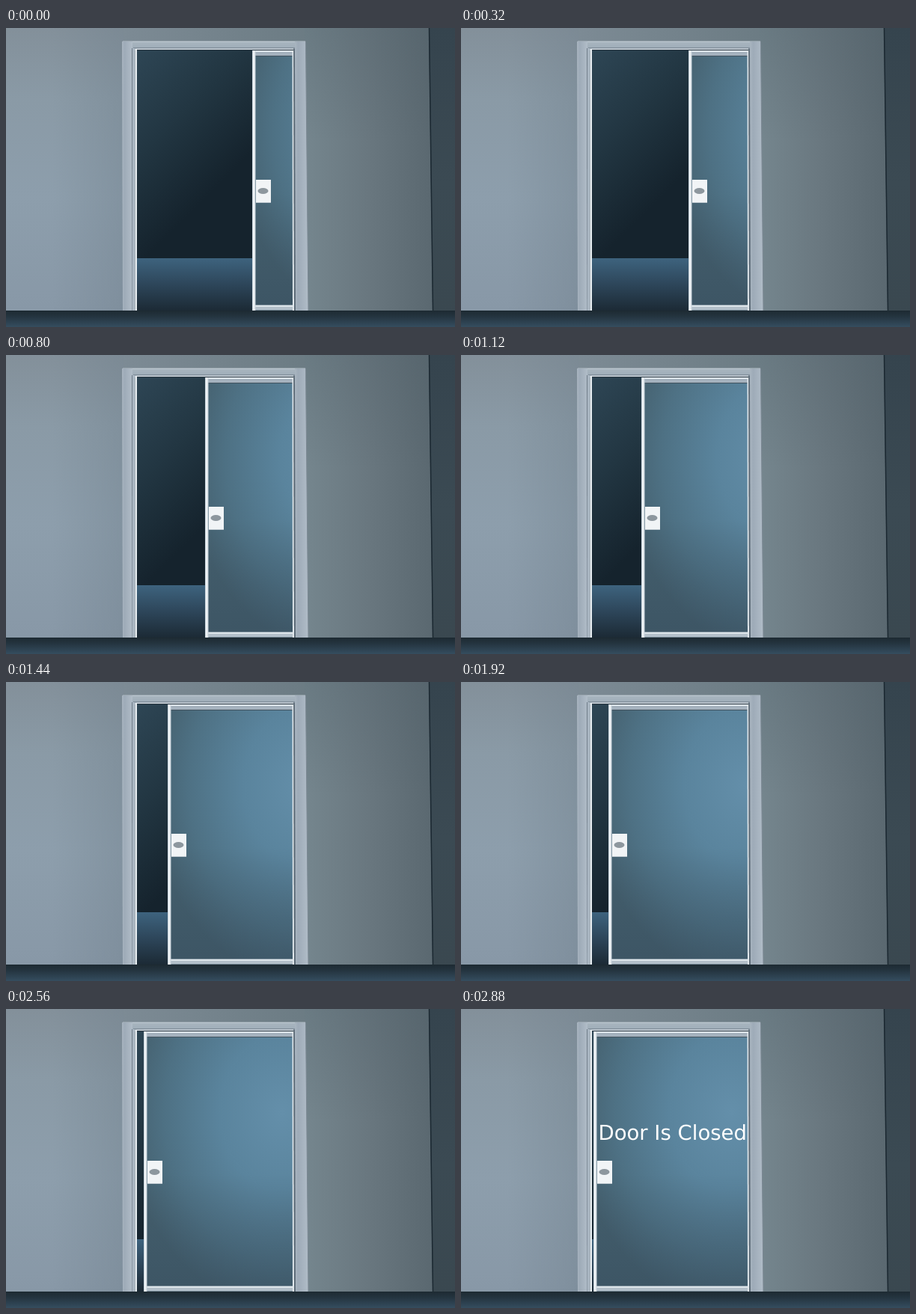
These frames come from a looping animation (600x400 px, 3.04 s). An HTML page:

```html
<!DOCTYPE html>
<html lang="en">
<head>
<meta charset="utf-8">
<title>Sliding door</title>
<style>
html, body { margin: 0; width: 100%; height: 100%; overflow: hidden; background: #1f2e37; }
svg { display: block; width: 100vw; height: 100vh; }
text {
  font: 27.5px "DejaVu Sans", Verdana, sans-serif;
  fill: #fff;
  text-anchor: middle;
  text-rendering: geometricPrecision;
}
</style>
</head>
<body>
<svg viewBox="0 0 600 400">
  <defs>
    <linearGradient id="wallLeft" x2="0" y2="1">
      <stop offset="0" stop-color="#83909a"/>
      <stop offset=".25" stop-color="#8a9aa6"/>
      <stop offset=".6" stop-color="#8d9eac"/>
      <stop offset="1" stop-color="#8898a7"/>
    </linearGradient>
    <linearGradient id="wallShade">
      <stop offset=".4" stop-color="#6e7e8a" stop-opacity="0"/>
      <stop offset="1" stop-color="#6e7e8a" stop-opacity=".35"/>
    </linearGradient>
    <linearGradient id="wallTop">
      <stop offset="0" stop-color="#7d8b95"/>
      <stop offset="1" stop-color="#6b7b83"/>
    </linearGradient>
    <linearGradient id="wallRight">
      <stop offset="0" stop-color="#75868e"/>
      <stop offset=".5" stop-color="#69777f"/>
      <stop offset="1" stop-color="#5a6870"/>
    </linearGradient>
    <linearGradient id="topShade" x2="0" y2="1">
      <stop offset="0" stop-color="#4a5a63" stop-opacity=".25"/>
      <stop offset=".4" stop-color="#4a5a63" stop-opacity="0"/>
    </linearGradient>
    <linearGradient id="corner" x2="0" y2="1">
      <stop offset="0" stop-color="#35444e"/>
      <stop offset=".55" stop-color="#3b4a53"/>
      <stop offset="1" stop-color="#3a4850"/>
    </linearGradient>
    <linearGradient id="ground" x2="0" y2="1">
      <stop offset="0" stop-color="#1d2a32"/>
      <stop offset=".35" stop-color="#24343f"/>
      <stop offset="1" stop-color="#354d5f"/>
    </linearGradient>
    <linearGradient id="room" gradientUnits="userSpaceOnUse" x1="175" y1="29" x2="320" y2="174">
      <stop offset="0" stop-color="#2e4655"/>
      <stop offset=".5" stop-color="#223642"/>
      <stop offset="1" stop-color="#15232d"/>
    </linearGradient>
    <linearGradient id="roomFloor" x2="0" y2="1">
      <stop offset="0" stop-color="#3e637e"/>
      <stop offset=".5" stop-color="#2d465a"/>
      <stop offset="1" stop-color="#1c2a35"/>
    </linearGradient>
    <linearGradient id="jamb">
      <stop offset="0" stop-color="#a9b5c0"/>
      <stop offset=".25" stop-color="#9eabb8"/>
      <stop offset="1" stop-color="#b1bdc8"/>
    </linearGradient>
    <linearGradient id="header" x2="0" y2="1">
      <stop offset="0" stop-color="#a9b6c0"/>
      <stop offset="1" stop-color="#9eacb8"/>
    </linearGradient>
    <radialGradient id="glass" gradientUnits="userSpaceOnUse" cx="0" cy="0" r="1"
      gradientTransform="translate(185 138) scale(210 262)">
      <stop offset="0" stop-color="#648faa"/>
      <stop offset=".4" stop-color="#5a849d"/>
      <stop offset=".75" stop-color="#4e7184"/>
      <stop offset="1" stop-color="#445f6d"/>
    </radialGradient>
    <linearGradient id="glassShade" x2="0" y2="1">
      <stop offset=".55" stop-color="#34495a" stop-opacity="0"/>
      <stop offset="1" stop-color="#34495a" stop-opacity=".45"/>
    </linearGradient>
    <clipPath id="opening"><path d="M175 29H384V378H175z"/></clipPath>
  </defs>

  <path fill="url(#wallTop)" d="M150 0H410V30H150z"/>
  <path fill="url(#wallLeft)" d="M0 0H157V378H0z"/>
  <path fill="url(#wallShade)" d="M0 0H157V378H0z"/>
  <path fill="url(#wallRight)" d="M399 0H570V378H399z"/>
  <path fill="url(#topShade)" d="M399 0H570V378H399z"/>
  <path fill="url(#corner)" d="M565 0H600V378H570z"/>
  <path stroke="#1b2831" stroke-width="1.5" d="M565.5 0L570.5 378"/>
  <path fill="url(#ground)" d="M0 378H600V400H0z"/>

  <path fill="url(#room)" d="M175 29H384V308H175z"/>
  <path fill="url(#roomFloor)" d="M175 308H384V378H175z"/>

  <g clip-path="url(#opening)">
    <g id="door">
      <path fill="url(#glass)" d="M0 30H215V378H0z"/>
      <path fill="url(#glassShade)" d="M0 30H215V378H0z"/>
      <path fill="#a5b2be" d="M0 30H215V37H0z"/>
      <path fill="#dfe7ec" d="M0 30H215V32H0z"/>
      <path fill="#42535f" d="M4 37H215V38H4z"/>
      <path fill="#b4c0ca" d="M0 370.5H215V377.5H0z"/>
      <path fill="#dde5ea" d="M4 371H215V373H4z"/>
      <path fill="#c6d1d9" d="M0 30H4.5V378H0z"/>
      <path fill="#edf2f5" d="M1 30H3.5V378H1z"/>
      <path fill="#f1f4f6" d="M5 203H25V234H5z"/>
      <path fill="#c3ccd3" d="M5 233H25V234H5z"/>
      <ellipse cx="14.5" cy="218" rx="7" ry="4" fill="#8d979e"/>
    </g>
  </g>

  <path fill="url(#header)" d="M156 18H401V28H156z"/>
  <path fill="#bac5ce" d="M156 17.5H400V19H156z"/>
  <path fill="#62707d" d="M170 26.5H386V27.5H170z"/>
  <path fill="#d3dce3" d="M173 27.5H384V29H173z"/>
  <path fill="#26343f" d="M175 29H384V30H175z"/>
  <path fill="url(#jamb)" d="M155 18H169V378H156z"/>
  <path fill="#6f7c89" d="M168 27H169V378H168.5z"/>
  <path fill="#a9b6c2" d="M169 27H172.5V378H169z"/>
  <path fill="#e8eef2" d="M172.5 28H175V378H172.5z"/>
  <path fill="url(#jamb)" d="M386 18H400.5L404 378H386z"/>
  <path fill="#e0e7ec" d="M382.5 30H384.5L385 378H383z"/>
  <path fill="#5d6b78" d="M384.5 28H386L387 378H385z"/>
  <path stroke="#7b8893" d="M400.5 18L404 378"/>

  <text id="label" x="282.7" y="175">Door Is Closed</text>
</svg>
<script>
const STEP = 160, STEPS = 19;
const door = document.getElementById("door");
const label = document.getElementById("label");

// Fast slide for ten steps, then a slow finish.
const doorX = k => Math.round(329.2 - 12.6 * Math.min(k, 10) - 3.25 * Math.max(k - 10, 0));

function draw(ms) {
  const k = Math.floor(ms / STEP) % STEPS;
  door.setAttribute("transform", `translate(${doorX(k)} 0)`);
  label.setAttribute("visibility", k === STEPS - 1 ? "visible" : "hidden");
}

const start = performance.now();
function tick() {
  draw(performance.now() - start);
  requestAnimationFrame(tick);
}
tick();
</script>
</body>
</html>
```
